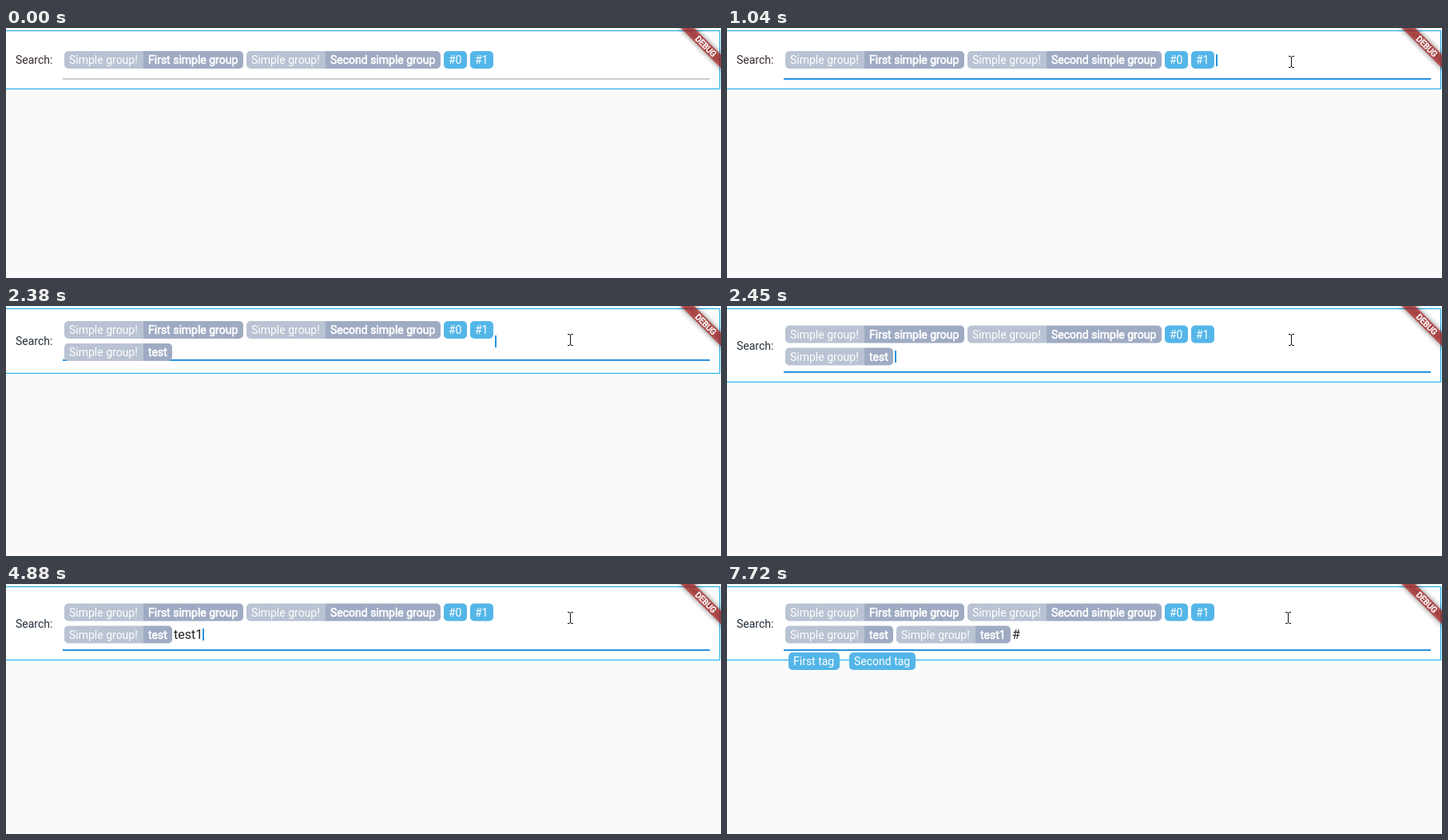
An HTML page for the animation above (7990 ms loop, 895 by 314 pixels).

```html
<!DOCTYPE html>
<html lang="en">
<head>
<meta charset="utf-8">
<title>Tag search field</title>
<style>
  html, body { margin: 0; width: 100%; height: 100%; overflow: hidden; background: #fafafa; }
  svg { display: block; font: 14px Roboto, sans-serif; }
  text { white-space: pre; }
  .chip text { fill: #fff; }
  .bold { stroke: #fff; stroke-width: .6px; }
  #input { font-size: 16px; fill: #24242a; }
</style>
</head>
<body>
<svg id="stage" width="895" height="314" viewBox="0 0 895 314">
  <defs>
    <filter id="soft" x="-20%" y="-150%" width="140%" height="400%">
      <feGaussianBlur stdDeviation="3.5"/>
    </filter>
  </defs>
  <rect width="895" height="314" fill="#fafafa"/>
  <rect id="panel" y="4" width="893" fill="#fff"/>
  <path id="frame" fill="none" stroke="#10a9ec"/>
  <text id="label" x="12">Search:</text>
  <rect id="line" x="71" width="810" height="2"/>
  <g id="rowA"></g>
  <g id="rowB"></g>
  <g id="tags" transform="translate(0 86)"></g>
  <text id="input"></text>
  <rect id="caret" width="2" height="15" fill="#2793e0"/>
  <g transform="translate(900 -1) rotate(45)">
    <rect x="-40" y="28" width="80" height="12" fill="#000" opacity=".5" filter="url(#soft)"/>
    <rect x="-40" y="28" width="80" height="12" fill="#b71c1c" opacity=".63"/>
    <text class="bold" y="37.6" text-anchor="middle" font-size="10.2" fill="#fff">DEBUG</text>
  </g>
  <path id="arrow" d="M0 0V16L3.7 12.6L6.2 18.2L8.6 17.2L6.2 11.7H11.3Z" fill="#000" stroke="#fff"/>
  <path id="beam" d="M-3 -6.5H-1L.5 -5.5L2 -6.5H4M.5 -5.5V6.5M-3 7.5H-1L.5 6.5L2 7.5H4" fill="none" stroke="#111"/>
</svg>
<script>
const LOOP = 7990;
const $ = id => document.getElementById(id);

function add(parent, tag, attrs, text) {
  const el = document.createElementNS('http://www.w3.org/2000/svg', tag);
  for (const k in attrs) el.setAttribute(k, attrs[k]);
  if (text) el.textContent = text;
  parent.appendChild(el);
  return el;
}

function set(id, attrs) {
  const el = $(id);
  for (const k in attrs) el.setAttribute(k, attrs[k]);
}

const show = (el, on) => el.setAttribute('display', on ? 'inline' : 'none');

function tagChip(row, x, w, text) {
  const g = add(row, 'g', { class: 'chip' });
  add(g, 'rect', { x, width: w, height: 22, rx: 5, fill: '#54b6e8' });
  add(g, 'text', { x: x + 6, y: 16 }, text);
  return g;
}

function groupChip(row, x, w, text) {
  const g = add(row, 'g', { class: 'chip' });
  const mid = x + 99, end = x + w;
  add(g, 'path', { d: `M${mid} 0H${x + 5}a5 5 0 0 0 -5 5v12a5 5 0 0 0 5 5H${mid}Z`, fill: '#b9c3d3' });
  add(g, 'path', { d: `M${mid} 0H${end - 5}a5 5 0 0 1 5 5v12a5 5 0 0 1 -5 5H${mid}Z`, fill: '#9fabc3' });
  add(g, 'text', { x: x + 6, y: 16 }, 'Simple group!');
  add(g, 'text', { x: mid + 6, y: 16, class: 'bold' }, text);
  return g;
}

groupChip($('rowA'), 73, 224, 'First simple group');
groupChip($('rowA'), 301, 243, 'Second simple group');
tagChip($('rowA'), 548, 29, '#0');
tagChip($('rowA'), 581, 29, '#1');
groupChip($('rowB'), 73, 135, 'test');
const extra = groupChip($('rowB'), 212, 143, 'test1');
tagChip($('tags'), 77, 64, 'First tag');
tagChip($('tags'), 153, 83, 'Second tag');

// Each entry below starts with the time it takes effect.
// One row, growing, two rows
const layouts = [
  [0, { row: 29, label: 45, line: 63, caret: 33, bottom: 76, ink: '#3b2a33' }],
  [2380, { row: 19, label: 49, line: 67, caret: 37, bottom: 84, ink: '#25303a' }],
  [2450, { row: 24.5, label: 55, line: 82, caret: 56, bottom: 95, ink: '#25303a' }]
];

const typed = [
  [0, ''], [1650, 't'], [1720, 'tes'], [1920, 'test'], [2380, ''],
  [3240, 't'], [3370, 'tes'], [3500, 'test'], [3960, 'test1'], [5870, ''], [7190, '#']
];

const inputX = [[0, 612], [2450, 210], [5940, 357]];

const caretOn = [
  [0, false], [900, true], [1380, false], [1650, true], [2910, false], [3240, true],
  [4420, false], [4880, true], [5410, false], [5870, true], [6400, false], [6860, true], [7720, false]
];

const path = [
  [827, 255], [806, 222], [780, 180], [757, 142], [739, 112], [727, 90],
  [718, 68], [710, 54], [700, 42], [695, 37], [699, 39], [706, 42]
];

function at(list, t) {
  let value;
  for (const [time, v] of list) if (time <= t) value = v;
  return value;
}

function mix(a, b, k) {
  return `rgb(${a.map((v, i) => Math.round(v + (b[i] - v) * k))})`;
}

function pointer(t) {
  if (t >= 5410) return [702, 42];
  return path[Math.min(path.length - 1, Math.floor((t - 65) / 69))];
}

function draw(t) {
  const l = at(layouts, t);
  set('panel', { height: l.bottom - 4 });
  set('frame', { d: `M0 3.5H893.5V${l.bottom + .5}H0` });
  set('label', { y: l.label, fill: l.ink });

  const focus = Math.max(0, Math.min(1, (t - 830) / 210));
  set('line', { y: l.line, fill: mix([203, 203, 210], [39, 147, 224], focus) });

  set('rowA', { transform: `translate(0 ${l.row})` });
  set('rowB', { transform: `translate(0 ${l.row + 28})` });
  show($('rowB'), t >= 2380);
  show(extra, t >= 5870);
  show($('tags'), t >= 7190);

  const x = at(inputX, t);
  const input = $('input');
  input.textContent = at(typed, t);
  set('input', { x, y: l.caret + 13 });
  const w = input.textContent ? input.getComputedTextLength() : 0;
  set('caret', { x: Math.round(x + w), y: l.caret });
  show($('caret'), at(caretOn, t));

  const p = pointer(t);
  const inside = p && p[1] < l.bottom;
  show($('beam'), p && inside);
  show($('arrow'), p && !inside);
  if (p) set(inside ? 'beam' : 'arrow', { transform: `translate(${p})` });
}

const t0 = performance.now();
function tick() {
  draw((performance.now() - t0) % LOOP);
  requestAnimationFrame(tick);
}
tick();
</script>
</body>
</html>
```
